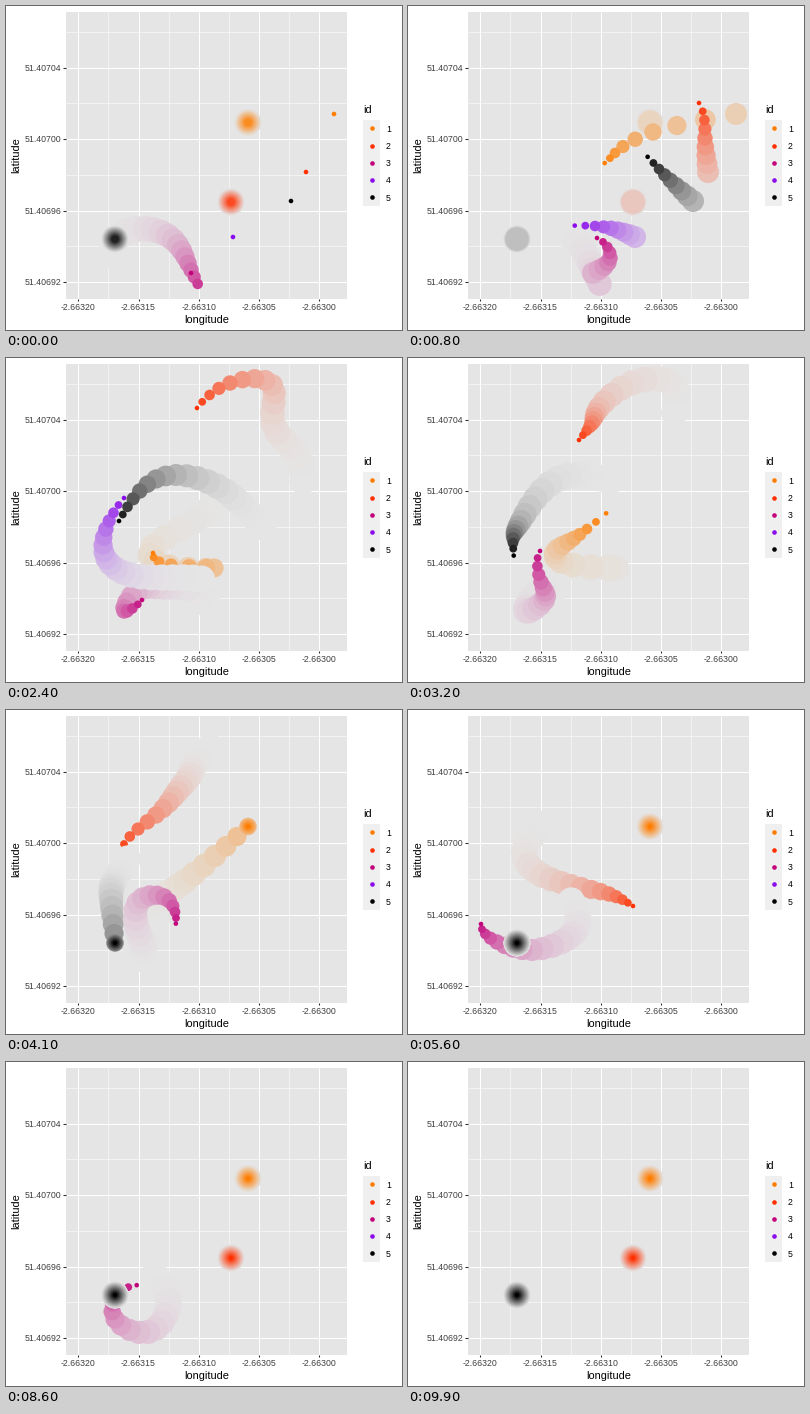
These frames come from a looping animation (396 by 324 pixels, 10 s). A matplotlib script:

```python
import numpy as np
import matplotlib.pyplot as plt
from matplotlib.animation import FuncAnimation
from matplotlib.colors import to_rgb
from matplotlib.patches import Rectangle

W, H, DPI = 396, 324, 72
FRAMES, STEP = 100, 100
WAKE = 20
R_HEAD, R_TAIL = 2.3, 13.4
PANEL = "#E5E5E5"
COLORS = ["#FF7D00", "#FF3000", "#C2007B", "#8A0BEC", "#000000"]


def walk(step, points, stays=False):
    """Natural cubic spline through evenly timed points, one row per frame."""
    p = np.array(points, float)
    n = len(p)
    a = 4 * np.eye(n) + np.eye(n, k=1) + np.eye(n, k=-1)
    a[[0, -1]] = np.eye(n)[[0, -1]]
    b = np.zeros_like(p)
    b[1:-1] = 6 * (p[2:] - 2 * p[1:-1] + p[:-2])
    m = np.linalg.solve(a, b)
    t = np.arange(min((n - 1) * step + 1, FRAMES - 1)) / step
    i = np.minimum(t.astype(int), n - 2)
    u = (t - i)[:, None]
    v = 1 - u
    xy = v * p[i] + u * p[i + 1] + ((v**3 - v) * m[i] + (u**3 - u) * m[i + 1]) / 6
    if stays:
        xy = np.vstack([xy, np.tile(p[-1], (FRAMES - len(xy), 1))])
    return xy


PATHS = [
    walk(3, [(328, 108), (245, 126), (207, 147), (188, 163), (147, 189),
             (163, 208), (208, 210), (165, 207), (147, 195), (160, 184),
             (179, 171), (209, 146), (242, 116.5)], True),
    walk(4, [(300, 166), (297, 132), (291, 97), (267, 65), (266, 27),
             (224, 25), (191, 50), (184, 65), (171, 82), (150, 105),
             (118, 134), (127, 161), (163, 175), (201, 184), (225, 196)], True),
    walk(4, [(185, 267), (202, 252), (189, 232), (157, 229), (131, 233),
             (118, 253), (136, 242), (133, 224), (132, 193), (158, 187),
             (170, 208), (160, 228), (124, 240), (89, 232), (73, 214),
             (92, 194), (127, 195), (154, 219), (162, 246), (142, 270),
             (109, 257), (115, 229), (148, 224), (172, 239), (185, 264),
             (199, 292)]),
    walk(6, [(227, 231), (187, 220), (125, 217), (97, 187), (118, 140),
             (155, 112)]),
    walk(6, [(285, 195), (251, 163), (211, 128), (150, 121), (113, 163),
             (105, 185), (109, 233)], True),
]

plt.rcParams["font.family"] = "Liberation Sans"
fig = plt.figure(figsize=(W / DPI, H / DPI), dpi=DPI, facecolor="white")
ax = fig.add_axes([0, 0, 1, 1])
ax.set(xlim=(0, W), ylim=(H, 0))
ax.axis("off")

X0, X1, Y0, Y1 = 60, 341, 5.5, 292.5
panel = Rectangle((X0, Y0), X1 - X0, Y1 - Y0, fc=PANEL, lw=0, zorder=0)
ax.add_patch(panel)


def line(x, y, color="white", lw=1.07):
    ax.plot(x, y, color=color, lw=lw, solid_capstyle="butt", zorder=1)


def label(x, y, text, size=8.8, color="#404040", **kw):
    ax.text(x, y, text, fontsize=size, color=color, **kw)


TICK = "#2B2B2B"
xs = 72.3 + 60.2 * np.arange(5)
ys = 61.5 + 71.6 * np.arange(4)
for x in xs[:-1] + 30.1:
    line([x, x], [Y0, Y1], lw=0.53)
for y in ys - 35.8:
    line([X0, X1], [y, y], lw=0.53)
for k, x in enumerate(xs):
    line([x, x], [Y0, Y1])
    line([x, x], [Y1, Y1 + 2.75], TICK)
    label(x, 304, f"{-2.6632 + k * 0.00005:.5f}", ha="center")
for k, y in enumerate(ys):
    line([X0, X1], [y, y])
    line([X0 - 2.75, X0], [y, y], TICK)
    label(55.3, y + 3.2, f"{51.40704 - k * 0.00004:.5f}", ha="right")

label(200.5, 317, "longitude", 11, "black", ha="center")
label(10, 149, "latitude", 11, "black", rotation=90, ha="center", va="center")

KEY, KEY_TOP = 17.28, 113.7
label(357, 107, "id", 11, "black")
ax.add_patch(Rectangle((357, KEY_TOP), KEY, 5 * KEY, fc="#EFEFEF", lw=0))
for k, color in enumerate(COLORS):
    y = KEY_TOP + (k + 0.5) * KEY
    ax.scatter(365.7, y, s=(2 * R_HEAD) ** 2, c=color, lw=0, zorder=3)
    label(379.8, y + 3.2, str(k + 1), color="black")

dots = ax.scatter([], [], lw=0, zorder=2)
dots.set_clip_path(panel)
BACK = np.array(to_rgb(PANEL))


def draw(frame):
    pos, size, fill = [], [], []
    for path, color in zip(PATHS, COLORS):
        if frame >= len(path):
            continue
        rgb = np.array(to_rgb(color))
        # Oldest first: the wake widens and fades into the panel colour.
        for lag in reversed(range(WAKE)):
            at = (frame - lag) % FRAMES
            if at >= len(path):
                continue
            w = (1 - lag / WAKE) ** 3
            pos.append(path[at])
            size.append((2 * (R_TAIL + (R_HEAD - R_TAIL) * w)) ** 2)
            fill.append(BACK + (rgb - BACK) * w)
    dots.set_offsets(pos)
    dots.set_sizes(size)
    dots.set_facecolor(fill)
    return [dots]


anim = FuncAnimation(fig, draw, frames=FRAMES, interval=STEP,
                     repeat=True, repeat_delay=0)
plt.show()
```
